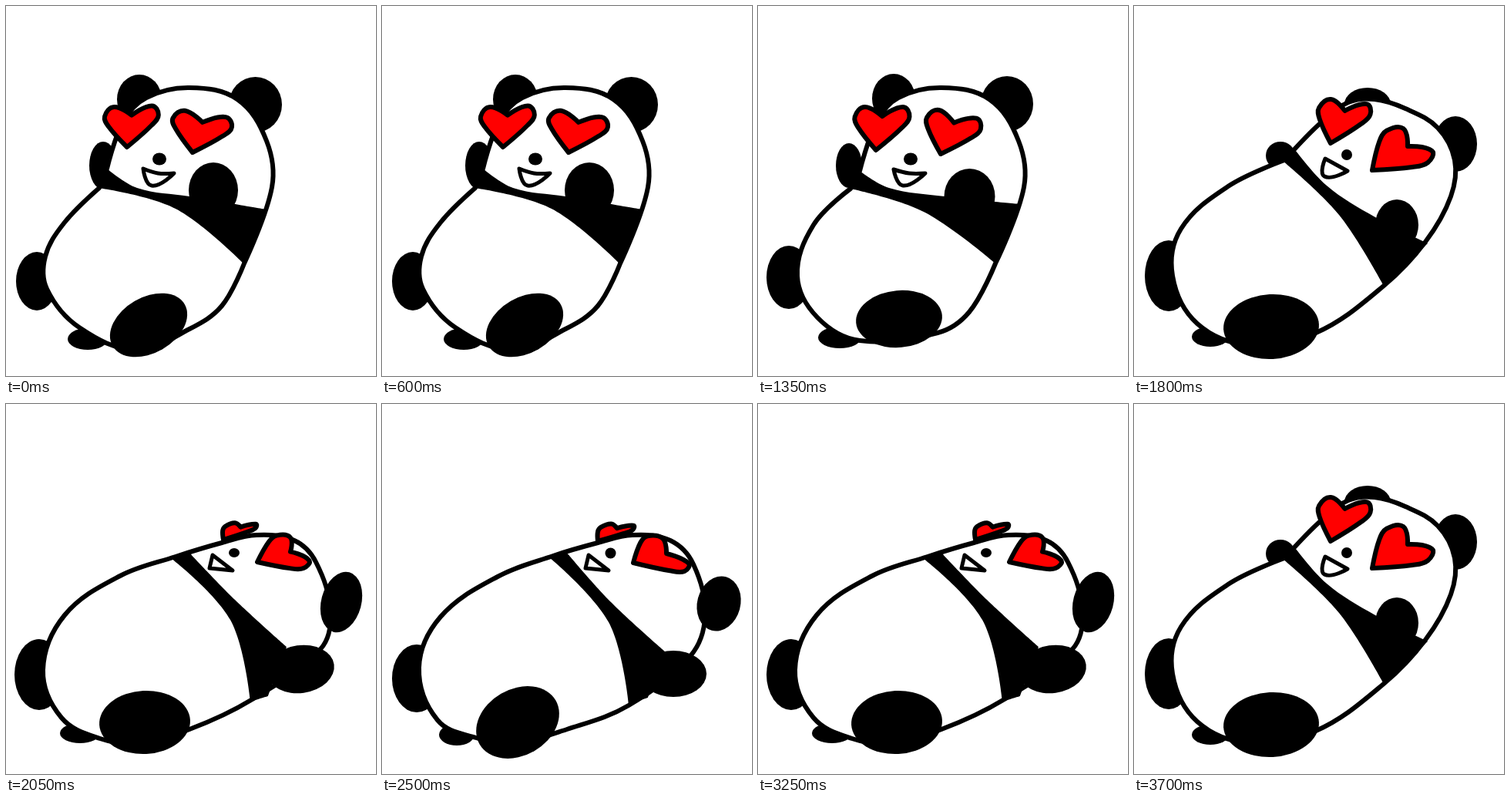
These frames come from a looping animation (480x480 px, 3.8 s). An HTML page:

```html
<!DOCTYPE html>
<html lang="en">
<head>
<meta charset="utf-8">
<title>Rolling panda</title>
<style>
  html, body { margin: 0; width: 100%; height: 100%; overflow: hidden; background: #fff; }
  svg { display: block; width: 100vw; height: 100vh; }
  g { visibility: hidden; }
  g.on { visibility: visible; }
  path { stroke: #000; stroke-linejoin: round; stroke-width: 0; }
  .body { fill: #fff; stroke-width: 6; }
  .heart { fill: #f00; stroke-width: 6; }
  .mouth { fill: #fff; stroke-width: 5; }
</style>
</head>
<body>
<svg id="stage" viewBox="0 0 480 480"></svg>
<script>
// Smooth closed curve through a few points; "!" marks a sharp corner.
function curve(text) {
  const pts = text.split(" ").map(s => {
    const [x, y] = s.split(",").map(parseFloat);
    return { x, y, sharp: s.endsWith("!") };
  });
  const n = pts.length;
  pts.forEach((p, i) => {
    const a = pts[(i + n - 1) % n], b = pts[(i + 1) % n];
    const d = p.sharp ? Infinity : Math.hypot(b.x - a.x, b.y - a.y);
    p.dx = (b.x - a.x) / d;
    p.dy = (b.y - a.y) / d;
  });
  let path = `M${pts[0].x},${pts[0].y}`;
  pts.forEach((p, i) => {
    const q = pts[(i + 1) % n];
    const k = 0.36 * Math.hypot(q.x - p.x, q.y - p.y);
    path += `C${p.x + p.dx * k},${p.y + p.dy * k} ${q.x - q.dx * k},${q.y - q.dy * k} ${q.x},${q.y}`;
  });
  return path + "Z";
}

const shape = (kind, text) => `<path class="${kind}" d="${curve(text)}"/>`;
const body = text => shape("body", text);
const band = text => shape("band", text);
const mouth = text => shape("mouth", text);
const blob = (x, y, rx, ry = rx, turn = 0) =>
  `<ellipse rx="${rx}" ry="${ry}" transform="translate(${x} ${y}) rotate(${turn})"/>`;

// One heart, skewed so that its lobes reach from the tip to the two given shoulders.
function heart(x, y, lx, ly, rx, ry) {
  const at = (a, b) => `${x + a * (lx - x) + b * (rx - x)},${y + a * (ly - y) + b * (ry - y)}`;
  const lobe = [[0.72, -0.15], [0.97, -0.12], [0.93, 0.17]];
  const left = lobe.map(([a, b]) => at(a, b));
  const right = lobe.map(([a, b]) => at(b, a)).reverse();
  return shape("heart", [at(0, 0) + "!", ...left, at(0.43, 0.43) + "!", ...right].join(" "));
}

const dome = "182,119 238,106 300,121 338,175 345,235";
const brow = "374,177 325,170 280,180";
const grin = mouth("268,196! 294,216! 264,213!");

// Each pose is painted from back to front.
const poses = {
  sitA:
    blob(173, 121, 29, 32) + blob(323.5, 128, 34.5, 36) + blob(126, 207, 18, 31) +
    blob(40, 357, 27, 38) + blob(106, 432, 26, 14) +
    body(`131,211! 152,150 ${dome} 309,334! 280,389 238,419 170,446 95,417 53,367 51,325 75,282 121,236!`) +
    band("131,211! 170,236 238,247 338,264! 308,334! 220,263 120,236!") +
    blob(269, 239, 32, 36) + blob(185, 414, 54, 36, -30) +
    heart(157, 183, 132, 136, 196, 134) + heart(242, 190, 222, 139, 292, 150) +
    blob(199, 198.5, 9, 8) + mouth("178,211! 197,217 218,217! 189,233"),
  sitB:
    blob(176, 120, 28, 32) + blob(323, 127, 34, 36) + blob(118, 207, 17, 29) +
    blob(40, 352, 29, 41) + blob(106, 430, 28, 14) +
    body(`132,214! 154,150 ${dome} 308,334! 274,397 233,424 132,434 77,404 51,350 72,284 120,237!`) +
    band("132,214! 170,236 242,247 340,257! 308,334! 215,267 120,237!") +
    blob(274.5, 247, 33, 36) + blob(183, 406, 56, 37, -5) +
    heart(153, 187, 130, 136, 195, 136) + heart(237, 192, 225, 138, 289, 152) +
    blob(198, 198.5, 9, 8) + mouth("176,212! 196,217 217,217! 188,233"),
  roll:
    blob(303, 127, 30, 21) + blob(417, 179, 28, 36) + blob(190, 194, 19, 18) +
    blob(45, 350, 31, 46) + blob(99, 429, 24, 13) +
    body("208,186! 244,150 278,125 312,121 352,133 394,158 416,200 411,247 378,306 324,363 236,424 150,440 82,412 50,350 61,289 122,234 195,200!") +
    band("207,184! 250,233 313,274 381,308! 324,363! 266,271 193,201!") +
    blob(341, 284, 28, 33) + blob(178, 416, 62, 42, -3) +
    heart(255, 178, 246, 125, 307, 133) + heart(309, 213, 338, 158, 387, 196) +
    blob(276, 193, 7) + mouth("248,198! 277,214! 247,221"),
  lieA:
    blob(45, 356, 32, 44) + blob(97, 429, 23, 14) +
    body(`222,197 150,224 76,276 48,342 72,410 122,433 170,440 240,422 320,391 400,327 419,275 404,208 ${brow}`) +
    band("239,192! 297,257 367,321! 345,381! 320,389! 294,283 217,199!") +
    blob(378, 350, 43, 30) + blob(176, 413, 57, 43, -30) + blob(437, 259, 28, 36, 15) +
    heart(280, 178, 290, 157, 328, 160) + heart(326, 206, 354, 171, 398, 213) +
    blob(296.5, 193.5, 7) + grin,
  lieB:
    blob(43, 351, 32, 46) + blob(96, 427, 26, 13) +
    body(`220,198 148,223 76,274 48,345 72,407 122,434 170,440 238,422 318,384 408,318 421,270 402,205 ${brow}`) +
    band("237,192! 297,254 364,315! 340,379! 317,386! 291,280 214,200!") +
    blob(382, 344, 44, 31, -8) + blob(180, 413, 59, 41, -3) + blob(435, 257, 26, 40, 15) +
    heart(282, 176, 290, 156, 326, 158) + heart(326, 205, 360, 170, 392, 209) +
    blob(296, 193, 7, 6) + grin
};

const stage = document.getElementById("stage");
stage.innerHTML = Object.entries(poses).map(([name, art]) => `<g id="${name}">${art}</g>`).join("");

// Wobble sitting, roll over, wobble lying, roll back.
function poseAt(t) {
  const wobble = start => Math.floor((t - start) / 150) % 2 ? "B" : "A";
  if (t < 1800) return "sit" + wobble(0);
  if (t < 1900 || t >= 3700) return "roll";
  return "lie" + wobble(1900);
}

function tick() {
  const name = poseAt(performance.now() % 3800);
  for (const g of stage.children) g.classList.toggle("on", g.id === name);
  requestAnimationFrame(tick);
}
tick();
</script>
</body>
</html>
```
